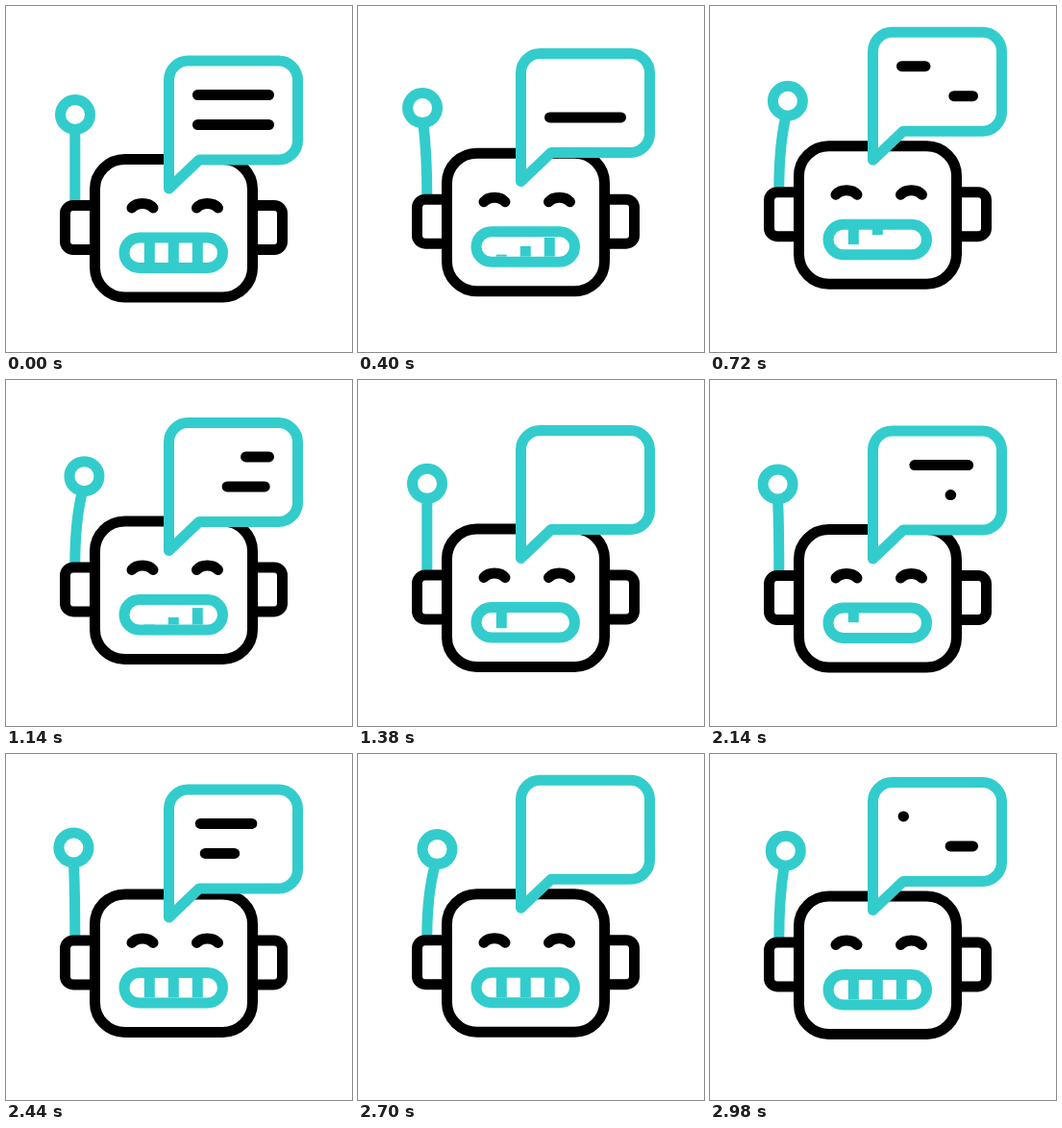
Recreate the animation shown at these times as an HTML page. Size 360 by 360 pixels, loop 3000 ms.

```html
<!DOCTYPE html>
<html lang="en">
<head>
<meta charset="utf-8">
<title>Chat robot</title>
<style>
  html, body { margin: 0; width: 100%; height: 100%; overflow: hidden; background: #fff; }
  svg { display: block; width: 100vw; height: 100vh; }
  path, rect, circle { fill: none; stroke-width: 11; stroke-linecap: round; stroke-linejoin: round; }
  .ink { stroke: #000; }
  .teal { stroke: #33cccc; }
  .flat { stroke-linecap: butt; }
  .solid { fill: #fff; }
</style>
</head>
<body>
<svg viewBox="0 0 360 360">
  <path id="stem" class="teal flat"/>
  <circle id="ball" class="teal" r="15.5"/>
  <g id="head">
    <path class="ink flat" d="M92 207.500H70A8.500 8.500 0 0 0 61.500 216V245A8.500 8.500 0 0 0 70 253.500H92"/>
    <path class="ink flat" d="M257 207.500H279A8.500 8.500 0 0 1 287.500 216V245A8.500 8.500 0 0 1 279 253.500H257"/>
    <rect class="ink" x="92.500" y="159.500" width="164" height="143.500" rx="31"/>
    <path class="ink" d="M131 210C136 204 148 204 153 210M198.500 210C203.500 204 215.500 204 220.500 210"/>
    <g id="teeth"></g>
    <rect class="teal" x="123" y="241" width="102.500" height="31.500" rx="15.750"/>
  </g>
  <g id="bubble">
    <path class="teal solid" d="M169.500 190V77A20 20 0 0 1 189.500 57H283.500A20 20 0 0 1 303.500 77V140A20 20 0 0 1 283.500 160H201Z"/>
    <path id="line1" class="ink"/>
    <path id="line2" class="ink"/>
  </g>
</svg>
<script>
const LOOP = 3000, BOB = 1800, SWEEP = 200;
const $ = id => document.getElementById(id);

// Each pass is [show, hide]: the end of a stroke sets off at show, its start at hide
const line1 = [[-200, 200], [643, 1018], [1583, 1610], [1974, 2085], [2306, 2416], [2960, 2962]];
const line2 = [[-200, 590], [972, 1052], [1567, 1636], [2016, 2017], [2339, 2399], [2740, 2857]];

// [show, hide, delay from one tooth to the next]
const bites = [[-800, 240, 60], [585, 960, 60], [1240, 1515, 150], [2040, LOOP, 100]];

function ease(t, from, to) {
  const u = Math.min(1, Math.max(0, (t - from) / (to - from)));
  return (1 - Math.cos(Math.PI * u)) / 2;
}

// Strokes always run in one direction, so only the latest pass matters
function trace(el, passes, t, path) {
  const [show, hide] = passes.findLast(pass => t >= pass[0]);
  const start = ease(t, hide, hide + SWEEP), end = ease(t, show, show + SWEEP);
  el.setAttribute("d", end > start ? path(start, end) : "");
}

const textLine = y => (a, b) => `M${199.5 + 74 * a} ${y}H${199.5 + 74 * b}`;
const toothLine = x => (a, b) => `M${x} ${245 + 22 * a}V${245 + 22 * b}`;

const teeth = [0, 1, 2].map(n => {
  const el = document.createElementNS("http://www.w3.org/2000/svg", "path");
  el.setAttribute("class", "teal flat");
  $("teeth").append(el);
  const passes = bites.map(([show, hide, gap]) => [show + gap * n, hide + gap * n]);
  return { el, passes, path: toothLine(149.3 + 25 * n) };
});

function drawAntenna(p, rise, dy) {
  const dx = -11 * ease(p, 280, 540) + 21.5 * ease(p, 540, 760) - 10.5 * ease(p, 1100, 1300);
  // Leaning over brings the ball down a little
  const stretch = 2.3 * rise * Math.max(0, 1 - Math.abs(dx) / 11);
  const x = 72 + dx, y = 113 + dy - stretch;
  $("ball").setAttribute("cx", x);
  $("ball").setAttribute("cy", y);
  $("stem").setAttribute("d", `M71.8 ${204 + dy}Q71.8 ${160 + dy} ${x - 0.2 - dx * 0.2} ${y + 16}`);
}

function draw(t) {
  const p = t % BOB;
  const rise = ease(p, 150, 680) - ease(p, 1030, 1600);
  const pop = ease(t, 350, 640) - ease(t, 760, 1060) + ease(t, 2314, 2604);
  const dy = -13.8 * rise;
  $("head").setAttribute("transform", `translate(0 ${dy})`);
  $("bubble").setAttribute("transform", `translate(0 ${dy - 16 * pop})`);
  drawAntenna(p, rise, dy);
  trace($("line1"), line1, t, textLine(92.5));
  trace($("line2"), line2, t, textLine(123.5));
  for (const { el, passes, path } of teeth) trace(el, passes, t, path);
}

const began = performance.now();
function tick() {
  draw((performance.now() - began) % LOOP);
  requestAnimationFrame(tick);
}
tick();
</script>
</body>
</html>
```
